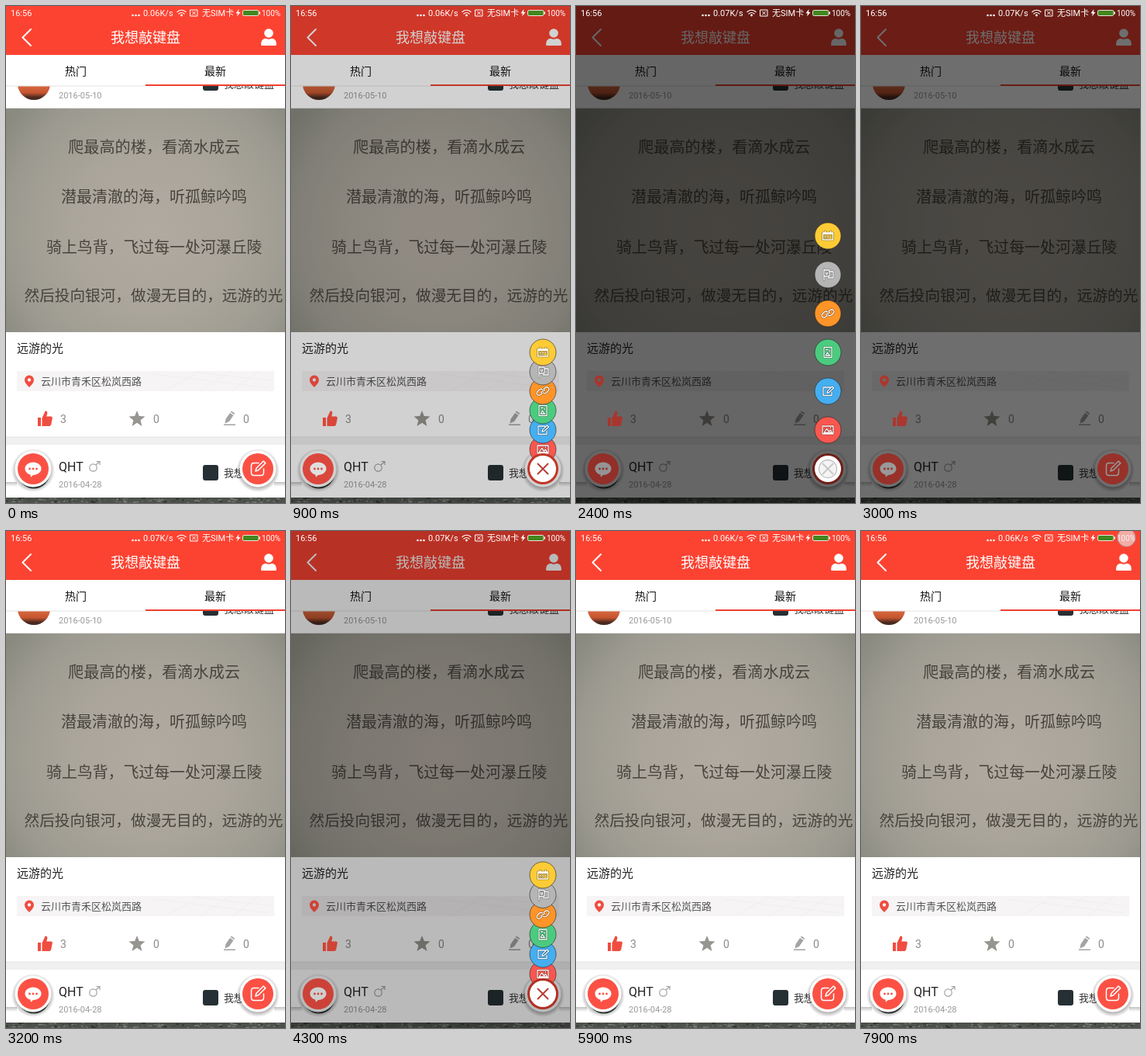
An HTML page for the animation above (8 s loop, 360 by 640 pixels).

```html
<!DOCTYPE html>
<html lang="zh-CN">
<head>
<meta charset="utf-8">
<title>Floating menu</title>
<style>
  html, body { margin: 0; width: 100%; height: 100%; overflow: hidden; background: #fff; }
  svg { display: block; width: 360px; height: 640px;
    font-family: Roboto, "Noto Sans CJK SC", "Noto Sans CJK", sans-serif; }
  .line { fill: none; stroke: #fff; stroke-width: 1.2; stroke-linecap: round; stroke-linejoin: round; }
  .poem { fill: #46433c; }
  .date { font-size: 11px; fill: #999; }
  .group { font-size: 13px; fill: #333; }
  .count { font-size: 14px; fill: #8b8b8b; }
</style>
</head>
<body>
<svg viewBox="0 0 360 640">
  <defs>
    <radialGradient id="paper" gradientUnits="userSpaceOnUse" cx="190" cy="290" r="235">
      <stop offset="0" stop-color="#b1aaa0"/>
      <stop offset=".45" stop-color="#aaa59b"/>
      <stop offset=".8" stop-color="#9c9a90"/>
      <stop offset="1" stop-color="#8a8a80"/>
    </radialGradient>
    <linearGradient id="leaves" x1="0" y1="0" x2="0" y2="1">
      <stop offset=".5" stop-color="#de6f45"/>
      <stop offset=".78" stop-color="#c4552f"/>
      <stop offset=".92" stop-color="#4a2a20"/>
    </linearGradient>
    <linearGradient id="shade" x1="0" y1="0" x2="0" y2="1">
      <stop offset="0" stop-color="#000" stop-opacity=".24"/>
      <stop offset="1" stop-color="#000" stop-opacity="0"/>
    </linearGradient>
    <radialGradient id="halo">
      <stop offset=".76" stop-color="#000" stop-opacity=".32"/>
      <stop offset="1" stop-color="#000" stop-opacity="0"/>
    </radialGradient>
    <clipPath id="feed"><path d="M0 103H360V640H0z"/></clipPath>
    <g id="plate">
      <circle cy="2" r="28" fill="url(#halo)"/>
      <circle r="23.5" fill="#fff"/>
    </g>
  </defs>

  <path fill="#fff" d="M0 0H360V640H0z"/>

  <!-- feed -->
  <g clip-path="url(#feed)">
    <circle cx="36" cy="100" r="21" fill="url(#leaves)"/>
    <text class="date" x="68" y="119">2016-05-10</text>
    <rect x="254" y="89" width="20" height="20" rx="3" fill="#263034"/>
    <text class="group" x="281" y="105">我想敲键盘</text>
    <path fill="#e2e2e2" d="M0 131H360V132H0z"/>

    <path fill="url(#paper)" d="M0 132H360V420H0z"/>
    <g class="poem">
      <text x="80" y="188.5" font-size="20.2">爬最高的楼，看滴水成云</text>
      <text x="71" y="253" font-size="20">潜最清澈的海，听孤鲸吟鸣</text>
      <text x="52" y="317.5" font-size="19.9">骑上鸟背，飞过每一处河瀑丘陵</text>
      <text x="23.5" y="380" font-size="19.65">然后投向银河，做漫无目的，远游的光</text>
    </g>

    <text x="14" y="445.5" font-size="15" fill="#222">远游的光</text>
    <path fill="#f6f4f5" d="M14 470H346V496H14z"/>
    <path fill="none" stroke="#f1eef0" d="M205 496l46-26M250 496l40-26M292 496l34-26M190 474l150 18M240 471l106 12"/>
    <text x="45" y="488" font-size="13" fill="#555">云川市青禾区松岚西路</text>

    <text class="count" x="70" y="537">3</text>
    <path id="star" fill="#97958f"/>
    <text class="count" x="190" y="537">0</text>
    <g fill="#a3a3a3">
      <path d="M283.500 532l5.500-8 4.500 3-5.500 8-5.500 2.500zM289.800 523l1-1.400 4.400 3-1 1.400z"/>
      <path d="M281 538.500H296V540H281z"/>
    </g>
    <text class="count" x="306" y="537">0</text>

    <path fill="#f0f0f0" d="M0 555H360V565H0z"/>
    <path fill="#e3e3e3" d="M0 554.500H360V555.500H0z"/>
    <circle cx="36" cy="601" r="20.500" fill="#3f4a44"/>
    <text x="68" y="599" font-size="16" fill="#222">QHT</text>
    <g fill="none" stroke="#a2a2a2" stroke-width="1.200">
      <circle cx="112.500" cy="594.500" r="4.700"/>
      <path d="M116 591l5-4.500M116.500 586.500H121V591"/>
    </g>
    <text class="date" x="68" y="620">2016-04-28</text>
    <rect x="254" y="591" width="20" height="20" rx="3" fill="#263034"/>
    <text class="group" x="281" y="606">我想敲键盘</text>
    <path fill="#4c514b" d="M0 633H360V640H0z"/>
    <g id="grass"></g>
    <path fill="url(#shade)" d="M0 613H14V619H0zM346 613H360V619H346z"/>
    <use href="#plate" x="35" y="596"/>
    <use href="#plate" x="325" y="596"/>
  </g>

  <!-- header and tabs -->
  <path fill="#fc4332" d="M0 0H360V63H0z"/>
  <path class="line" style="stroke-width:2" d="M32 30L21.500 40.500 32 51"/>
  <text x="180" y="47" font-size="18" fill="#fff" text-anchor="middle">我想敲键盘</text>
  <g fill="#fff">
    <circle cx="339" cy="35" r="5.800"/>
    <path d="M329 49.500Q329 42.500 335 41.800Q339 43.800 343 41.800Q349 42.500 349 49.500Q349 51 347.500 51H330.500Q329 51 329 49.500z"/>
  </g>
  <g font-size="14" fill="#111" font-weight="500" text-anchor="middle">
    <text x="90" y="88.500">热门</text>
    <text x="270" y="88.500">最新</text>
  </g>
  <path fill="#e4e4e4" d="M0 102.500H180V103.500H0z"/>
  <path fill="#f0402f" d="M180 101H360V103H180z"/>

  <path id="dim" d="M0 0H360V640H0z" opacity="0"/>

  <!-- status bar -->
  <g fill="#fff" font-size="11">
    <text x="6" y="13">16:56</text>
    <circle cx="163.500" cy="12" r="1.300"/><circle cx="167.500" cy="12" r="1.300"/><circle cx="171.500" cy="12" r="1.300"/>
    <text id="speed" x="177" y="13">0.06K/s</text>
    <path class="line" d="M221 7.500q5.500-4.500 11 0M223 10q3.500-3 7 0"/>
    <circle cx="226.500" cy="12" r="1.400"/>
    <path class="line" style="stroke-width:1" d="M238 5H247V13H238zM240.500 7l4 4M244.500 7l-4 4"/>
    <text x="253" y="13">无SIM卡</text>
    <path d="M300.500 4l-4 5.500h2.500l-1 4 4.500-5.500h-2.500z"/>
    <rect x="305.500" y="5.500" width="20.500" height="7" rx="1.800" fill="#43861f" stroke="#fff" stroke-opacity=".85"/>
    <path d="M326.500 7.500H328V10.500H326.500z"/>
    <text x="330" y="13" font-size="10">100%</text>
  </g>

  <!-- red accents -->
  <g id="accent" fill="#f04d40">
    <path fill-rule="evenodd" d="M30 475.500a6 6 0 0 1 6 6q0 4-6 9.500-6-5.500-6-9.500a6 6 0 0 1 6-6zm0 3.800a2.200 2.200 0 1 0 .01 0z"/>
    <path d="M41 530H45V541H41zM46.500 530.500L50 523q.5-2 2.200-1.200 1.800 1 .8 4.200l-.8 2.500H58q2.200.3 1.800 2.500l-1.600 8q-.5 2-2.500 2H46.500z"/>
  </g>

  <g id="chat" fill="#fb5145">
    <circle cx="35" cy="596" r="20"/>
    <path fill="#fff" d="M35 587.500c6 0 10.500 3.700 10.500 8.300s-4.500 8.200-10.500 8.200l-3 2.800-.6-3.200c-4-1.100-6.900-4.200-6.900-7.800 0-4.600 4.500-8.300 10.500-8.300z"/>
    <circle cx="30.500" cy="596" r="1.400"/><circle cx="35" cy="596" r="1.400"/><circle cx="39.500" cy="596" r="1.400"/>
  </g>

  <g id="items"></g>

  <g id="shut">
    <circle cx="325" cy="596" r="20" fill="#fb5145"/>
    <path class="line" style="stroke-width:1.500" d="M326 588.500H320q-3.500 0-3.500 3.500V601q0 3.500 3.500 3.500H329q3.500 0 3.500-3.500V596M322 599l1-3.800 9.200-9.200 2.600 2.600-9.200 9.200z"/>
  </g>
  <g id="open" transform="translate(325 596)">
    <circle id="rim" r="20" fill="#e5402f"/>
    <circle r="17" fill="#fff"/>
    <path id="cross" class="line" style="stroke-width:1.800" d="M-6.500-6.500L6.500 6.500M6.500-6.500L-6.500 6.500"/>
  </g>
  <circle id="touch" r="11.500" fill="#eee" fill-opacity=".62" stroke="#999" stroke-opacity=".6" stroke-width="1.300"/>
</svg>

<script>
const $ = id => document.getElementById(id);
const LOOP = 8000, SPREAD = 50, DARK = .6;

// Menu items from the button upwards: colour and icon
const menu = [
  ['#f9574f', 'M-7-5H7V5H-7zM-5 3.500l3.500-5 3 3.500 2-2 2 3.500zM3.500-3v.5'],
  ['#45aef0', 'M3-5H-6V5.500H5V1M-1 2l.6-2.400L5.500-6l2 2L1.500 1.500z'],
  ['#4bcb7f', 'M-5-6.500H5V6.500H-5zM-2.500-3.500H0M-3 4l2.500-4L2 4M-3 4H3M2-3v2'],
  ['#ff9428', 'M-1 2.500l-2 2q-2 1.500-4 0t0-4l2.500-2.500q2-1.500 4 0M1-2.500l2-2q2-1.500 4 0t0 4L4.500 2q-2 1.500-4 0M-2.500 1.500l5-3'],
  ['#b5b5b5', 'M-5-7V7M-5-6H2V2H-5M2-4H7V4H0M-2.500-3V-1q1 1.500 2 0V-3'],
  ['#fdcb35', 'M-6.500-4H6.500V5H-6.500zM-3.500-6v2M3.500-6v2M-6.500-2.500H6.500M-6.500-3.300H6.500M-3.500 .5h.5M-.3 .5h.5M3 .5h.5M-3.500 2.700h.5M-.3 2.700h.5']
];
$('items').innerHTML = menu.map(([color, icon]) => `<g>
  <circle r="17" fill="${color}" stroke="#222" stroke-opacity=".6"/>
  <path class="line" style="stroke:#0007;stroke-width:2.400" d="${icon}"/>
  <path class="line" style="stroke-width:1.300" d="${icon}"/></g>`).join('');
const items = [...$('items').children];

let star = '';
for (let i = 0; i < 10; i++) {
  const r = i % 2 ? 4.8 : 11, a = (i / 5 - .5) * Math.PI;
  star += `${i ? 'L' : 'M'}${169 + r * Math.cos(a)} ${532 + r * Math.sin(a)}`;
}
$('star').setAttribute('d', star + 'z');

let seed = 7;
const rand = () => (seed = seed * 16807 % 2147483647) / 2147483647;
let grass = '';
for (let i = 0; i < 150; i++) {
  const c = 35 + rand() * 100 | 0;
  grass += `<rect x="${rand() * 358}" y="${633 + rand() * 6}" width="${1 + rand() * 4}" height="1.500" fill="rgb(${c},${c + 4},${c - 3})"/>`;
}
$('grass').innerHTML = grass;

// [time, spread of the items, darkness of the shade]
const steps = [
  [0, 0, 0],
  [800, .11, .03], [900, .5, .18], [1000, .77, .33], [1100, .94, .45], [1200, 1, DARK],
  [2800, .75, DARK], [2900, .3, DARK], [3000, 0, .57], [3100, 0, .3], [3200, 0, 0],
  [4100, .08, .02], [4200, .28, .13], [4300, .51, .27], [4400, 1, DARK],
  [5300, .75, DARK], [5400, .3, DARK], [5500, 0, .57], [5600, 0, .3], [5700, 0, 0]
];
const taps = [[400, 800], [2400, 2800], [3700, 4100], [4800, 5300]];
const show = (id, on) => $(id).style.display = on ? '' : 'none';
const darken = (id, amount) => $(id).style.filter = `brightness(${1 - amount})`;

function draw(t) {
  const [, spread, dark] = steps.filter(s => s[0] <= t).pop();
  const isOpen = spread > 0;
  $('dim').setAttribute('opacity', dark);
  darken('accent', dark * .5);
  darken('chat', dark * .7);
  darken('shut', dark * .7);
  darken('rim', dark * .85);
  items.forEach((el, i) =>
    el.setAttribute('transform', `translate(325 ${596 - SPREAD * (i + 1) * spread})`));
  show('items', isOpen);
  show('open', isOpen);
  show('shut', !isOpen);

  const tapped = taps.some(([a, b]) => t >= a && t < b), pulled = t >= 7600;
  show('touch', tapped || pulled);
  $('touch').setAttribute('transform', pulled ? 'translate(342.500 8.500)' : 'translate(325 596)');
  $('cross').style.stroke = tapped ? '#8a8a8a' : '#b8392f';
  $('speed').textContent = t >= 1600 && t < 5900 ? '0.07K/s' : '0.06K/s';
}

const start = performance.now();
function tick() {
  draw((performance.now() - start) % LOOP);
  requestAnimationFrame(tick);
}
tick();
</script>
</body>
</html>
```
